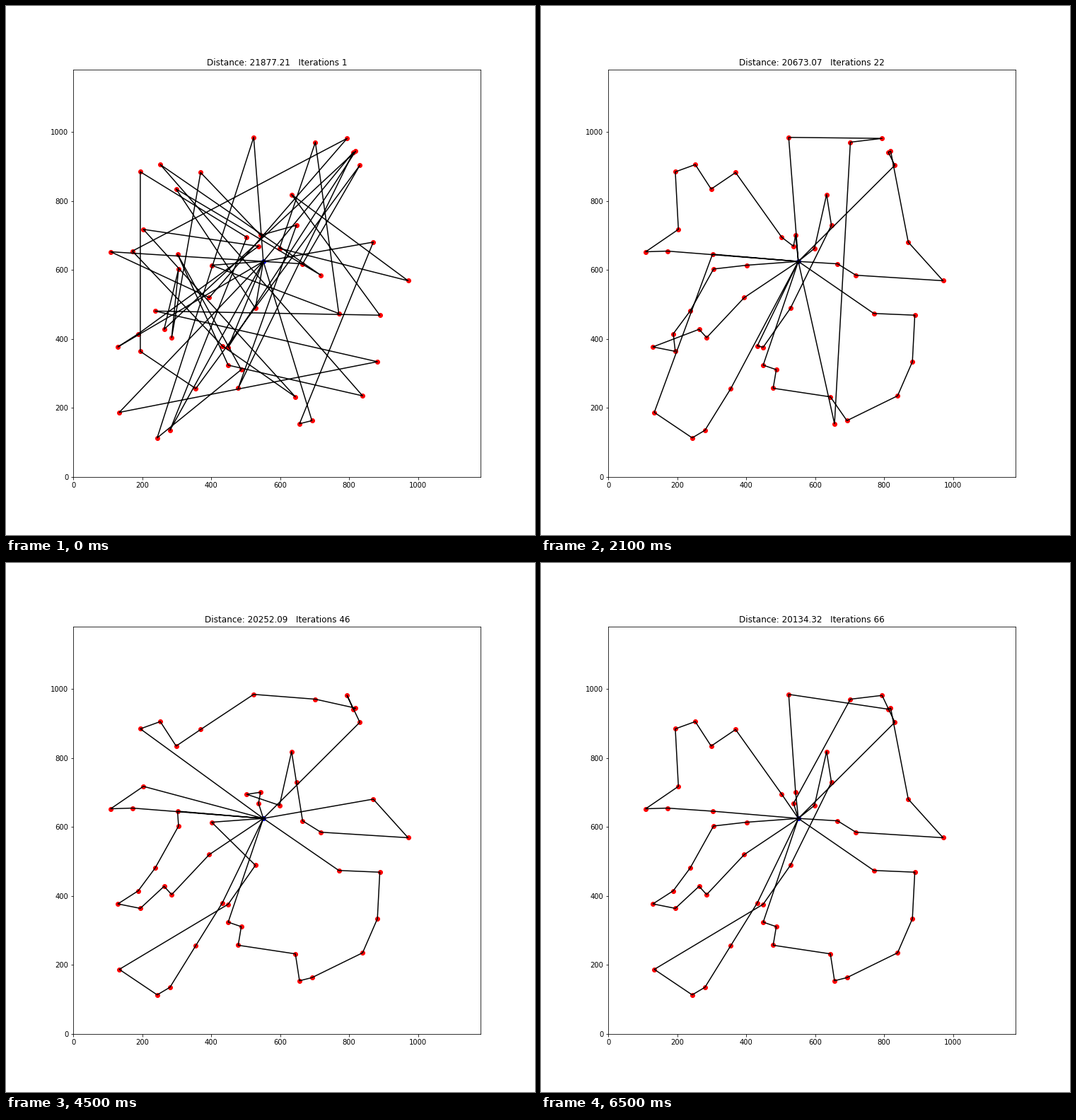
Animation, 748 px wide and 748 px high, one loop 8 s. Source, as a matplotlib script:

```python
import numpy as np
import matplotlib.pyplot as plt
from matplotlib.animation import FuncAnimation

FRAMES, INTERVAL, LAST_ITERATION = 80, 100, 66
SIZE, DPI, LIMIT = 748, 72, 1182
MIN_STOPS, MAX_STOPS = 4, 10

DEPOT = (551, 625)
# Customers, listed in the order in which the settled tour visits them.
ROUTES = [
    [(543, 701), (523, 985), (812, 942), (819, 945), (870, 681), (971, 569),
     (718, 585), (665, 618)],
    [(537, 669), (702, 971), (794, 982), (831, 904)],
    [(770, 474), (889, 469), (882, 334), (839, 235), (692, 163), (656, 154),
     (644, 232), (478, 257), (487, 311), (449, 324)],
    [(598, 663), (633, 819), (647, 730), (528, 489), (449, 376), (133, 187),
     (243, 113), (280, 135), (355, 256), (432, 380)],
    [(394, 520), (285, 404), (263, 428), (194, 364), (129, 377), (188, 415),
     (237, 481), (305, 603), (401, 614)],
    [(302, 646), (171, 655), (108, 653), (203, 718), (194, 885), (252, 906),
     (298, 835), (369, 883), (503, 695)],
]

PLACES = np.array([DEPOT] + [stop for route in ROUTES for stop in route])
COUNT = len(PLACES)

settled = [0]
for route in ROUTES:
    first = max(settled) + 1
    settled += [*range(first, first + len(route)), 0]

trail = np.zeros((COUNT, COUNT))
trail[settled[:-1], settled[1:]] = 1
trail = np.maximum(trail, trail.T)

gaps = np.linalg.norm(PLACES[:, None] - PLACES[None], axis=2)
np.fill_diagonal(gaps, np.inf)


def ant_tour(appeal, rng):
    """Visit every customer, returning to the depot between routes."""
    tour, load = [0], 0
    waiting = list(range(1, COUNT))
    while waiting:
        options = waiting + ([0] if load >= MIN_STOPS else [])
        if load == MAX_STOPS:
            options = [0]
        weights = appeal[tour[-1], options]
        step = int(rng.choice(options, p=weights / weights.sum()))
        tour.append(step)
        load = load + 1 if step else 0
        if step:
            waiting.remove(step)
    return tour + [0]


def solution(iteration):
    """Ants start at random, learn to prefer near stops, then follow the trail."""
    if iteration == LAST_ITERATION:
        return settled
    progress = (iteration - 1) / (LAST_ITERATION - 1)
    greed = 4 * (1 - np.exp(-(iteration - 1) / 2))
    appeal = (60 / gaps) ** greed + 30 * progress ** 1.5 * trail
    return ant_tour(appeal, np.random.default_rng(iteration))


def distance(iteration):
    return np.interp(iteration, [1, 10, 17, 28, 39, 52, 66],
                     [21877.21, 20673.49, 20839.93, 20472.84, 20300.45,
                      20210.64, 20134.32])


tours = [solution(i + 1) for i in range(LAST_ITERATION)]

plt.rcParams["font.family"] = "DejaVu Sans"
fig, ax = plt.subplots(figsize=(SIZE / DPI, SIZE / DPI), dpi=DPI)
ax.set(xlim=(0, LIMIT), ylim=(0, LIMIT), aspect="equal")
ax.plot(*PLACES[1:].T, "o", color="red")
ax.plot(*DEPOT, "o", color="blue")
path, = ax.plot([], [], color="black")
title = ax.set_title("")


def update(frame):
    iteration = min(frame + 1, LAST_ITERATION)
    path.set_data(*PLACES[tours[iteration - 1]].T)
    title.set_text(f"Distance: {distance(iteration):.2f}   Iterations {iteration}")
    return path, title


anim = FuncAnimation(fig, update, frames=FRAMES, interval=INTERVAL,
                     repeat=True, repeat_delay=0, blit=False)
plt.show()
```
